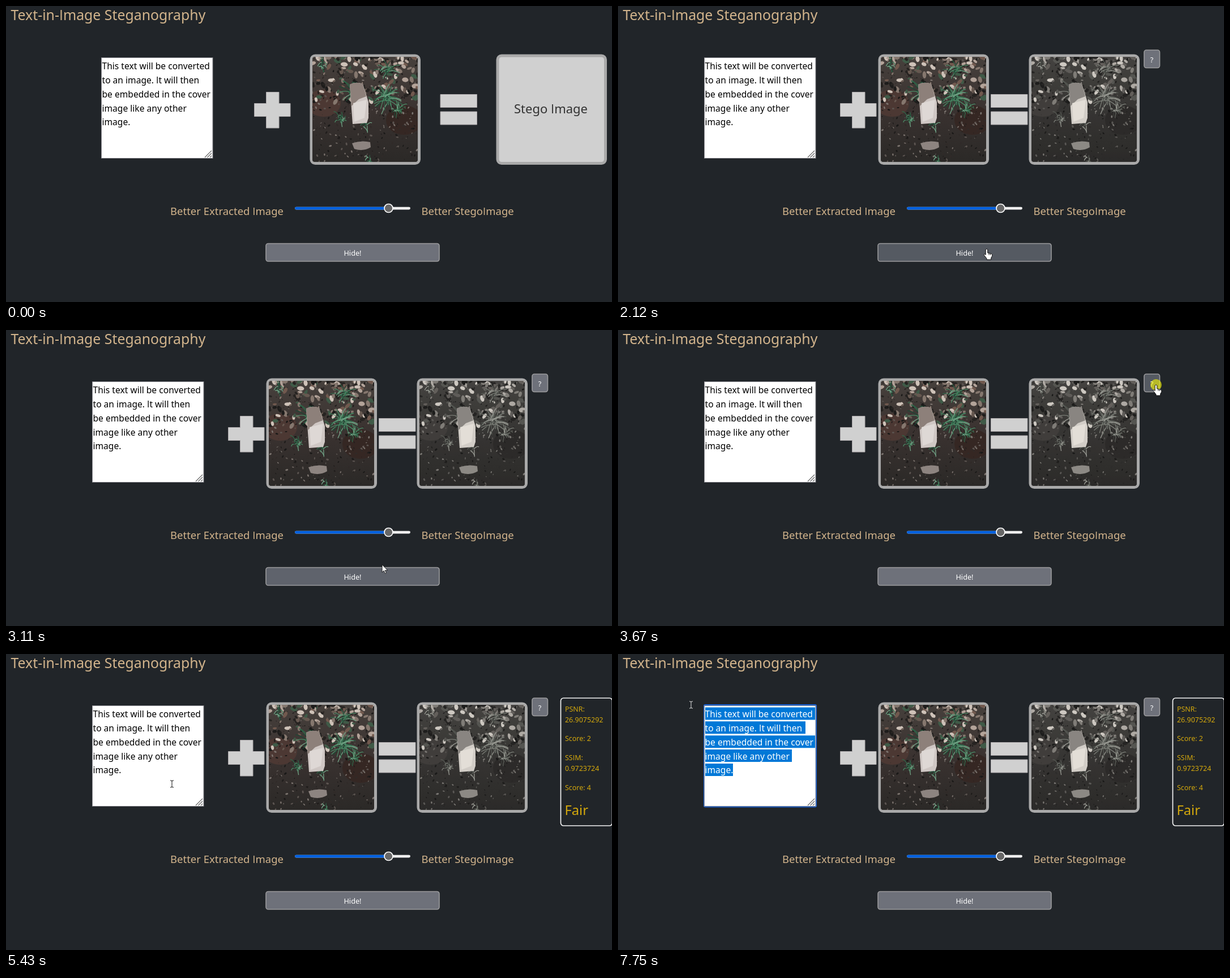
Animation of 1070x524 px, one loop 8000 ms. Source, as an HTML page:

```html
<!DOCTYPE html>
<html lang="en">
<head>
<meta charset="utf-8">
<title>Text-in-Image Steganography</title>
<style>
html, body { margin: 0; width: 100%; height: 100%; overflow: hidden; background: #212529; }
svg { display: block; width: 1070px; height: 524px; }
text { font-family: "Noto Sans", sans-serif; white-space: pre; }
.i { font-family: "Open Sans", sans-serif; }
.tan { fill: #d2b48c; }
.label { font-size: 18.5px; }
.note { font-size: 15.6px; }
.button { stroke: #9b9b9d; stroke-width: 1.6; }
.caption { font-size: 12.7px; fill: #fff; text-anchor: middle; }
.sign { fill: #d0d0d0; stroke: #aaa6a8; stroke-width: 1; }
.frame { fill: none; stroke: #a9a9a9; stroke-width: 5; }
.score { font-size: 12.45px; fill: #d4a80c; }
.pointer { fill: #fff; stroke: #000; stroke-width: .9; stroke-linejoin: round; }
</style>
</head>
<body>
<svg viewBox="0 0 1070 524">
  <defs>
    <clipPath id="inner"><rect width="186" height="186" rx="4"/></clipPath>
    <clipPath id="selected"></clipPath>
    <linearGradient id="soil" x2="0" y2="1">
      <stop offset="0" stop-color="#46403c"/>
      <stop offset=".5" stop-color="#3a3230"/>
      <stop offset="1" stop-color="#2b2927"/>
    </linearGradient>
    <g id="photo" clip-path="url(#inner)"></g>
    <g id="lines" class="note"></g>
  </defs>

  <rect width="1070" height="524" fill="#212529"/>
  <text class="tan" x="8.5" y="25" font-size="24.85">Text-in-Image Steganography</text>

  <g id="note">
    <rect id="focus" x="167" y="89" width="200" height="182.5" rx="3" fill="#1a62d6"/>
    <rect x="168.5" y="91.5" width="196.500" height="178" fill="#fff" stroke="#85858b"/>
    <use href="#lines" fill="#000"/>
    <g clip-path="url(#selected)">
      <rect x="168" y="91" width="200" height="180" fill="#0078d7"/>
      <use href="#lines" fill="#fff"/>
    </g>
    <path d="M351 268L363 256M355.500 268L363 260.500M360 268L363 265" stroke="#666" stroke-width="1.100"/>
  </g>

  <path id="plus" class="sign" d="M459.500 152.500h22.500v20h20v23h-20v20.500h-22.500v-20.500h-21v-23h21z"/>
  <g id="cover">
    <rect class="frame" x="539" y="88" width="190.500" height="190.500" rx="7"/>
    <use href="#photo" x="541" y="90"/>
  </g>
  <path id="equals" class="sign" d="M767 156.500h64.500v23h-64.500zM767 187h64.500v23h-64.500z"/>

  <g id="empty">
    <rect class="frame" x="868" y="88" width="190.500" height="190.500" rx="7" style="fill:#d0d0d0"/>
    <text x="897" y="190" font-size="22" fill="#333">Stego Image</text>
  </g>
  <g id="result">
    <rect class="frame" x="728" y="88" width="190.500" height="190.500" rx="7"/>
    <g style="filter:grayscale(.9) sepia(.12)"><use href="#photo" x="730" y="90"/></g>
    <rect id="help" class="button" x="929" y="78" width="27.500" height="31.500" rx="4"/>
    <text class="caption" x="942.500" y="99.500">?</text>
  </g>

  <g id="panel">
    <rect x="979.500" y="78" width="91" height="226" rx="5" fill="none" stroke="#f4f4f4" stroke-width="1.700"/>
    <g class="score">
      <text x="987" y="101.500">PSNR:</text>
      <text x="987" y="121">26.9075292</text>
      <text x="987" y="154">Score: 2</text>
      <text x="987" y="187.500">SSIM:</text>
      <text x="987" y="207">0.9723724</text>
      <text x="987" y="240.500">Score: 4</text>
      <text x="986.500" y="285" font-size="23.700">Fair</text>
    </g>
  </g>

  <text class="tan label" x="290" y="370">Better Extracted Image</text>
  <text class="tan label" x="733.500" y="370">Better StegoImage</text>
  <rect x="510" y="355.700" width="204" height="4.800" rx="2.400" fill="#efefef"/>
  <rect x="510" y="355.700" width="165" height="4.800" rx="2.400" fill="#0060df"/>
  <circle cx="675.500" cy="358" r="7.500" fill="#676767" stroke="#fff" stroke-width="1.700"/>

  <rect id="hide" class="button" x="459" y="420.500" width="306" height="31.500" rx="4"/>
  <text id="hideText" class="caption" x="612" y="441.700">Hide!</text>

  <g id="cursor">
    <circle id="click" r="10" fill="#ff0" fill-opacity=".58"/>
    <path id="arrow" class="pointer" transform="scale(.85)" d="M0 0V16L3.700 12.500 6.300 18.500 8.700 17.400 6 11.800H11.300Z"/>
    <path id="hand" class="pointer" d="M-1.800 1Q0-1 1.700 1V7L8 8.500Q10.300 9.500 9.700 12.500L7.700 16V19H0V17L-5 10.500Q-4.500 8-1.800 10.500ZM4 8V11M6.500 8.500V11"/>
    <path id="beam" fill="none" d="M-3-6H-1L0-5 1-6H3M0-5V5M-3 6H-1L0 5 1 6H3"/>
  </g>
</svg>

<script>
const el = Object.fromEntries([...document.querySelectorAll('[id]')].map(e => [e.id, e]));
const LOOP = 8000, LAYOUT_AT = 2120;

let seed = 71;
const rand = (lo = 0, hi = 1) => {
  seed = (seed * 16807) % 2147483647;
  return lo + (hi - lo) * seed / 2147483647;
};
const pick = list => list[Math.floor(rand(0, list.length))];
const n1 = v => v.toFixed(1);

function blob(x, y, size, color) {
  return `<ellipse rx="${n1(size)}" ry="${n1(size * rand(.4, .7))}" fill="${color}" ` +
    `transform="translate(${n1(x)} ${n1(y)}) rotate(${n1(rand(0, 180))})"/>`;
}

function tuft(x, y, reach, blades) {
  let out = '';
  for (let i = 0; i < blades; i++) {
    const angle = rand(0, 2 * Math.PI), len = rand(.4, 1) * reach;
    const dx = Math.cos(angle) * len, dy = Math.sin(angle) * len;
    out += `<path d="M${n1(x + rand(-6, 6))} ${n1(y + rand(-6, 6))}q${n1(dx * .6)} ${n1(dy * .6 - 4)} ${n1(dx)} ${n1(dy)}" ` +
      `fill="none" stroke="${pick(['#2f6548', '#4b8a66', '#1f4634', '#73a487'])}" stroke-width="1.3"/>`;
  }
  return out;
}

function buildPhoto() {
  let out = '<rect width="186" height="186" fill="url(#soil)"/>';
  out += '<ellipse cx="20" cy="82" rx="30" ry="24" fill="#4c3833"/><ellipse cx="162" cy="112" rx="32" ry="26" fill="#352723"/>';
  for (let i = 0; i < 420; i++)
    out += blob(rand(0, 186), rand(0, 186), rand(.8, 2.6), pick(['#191817', '#201d1c', '#5c5551', '#7b736e', '#302a28']));
  for (let i = 0; i < 190; i++)
    out += blob(rand(0, 186), 80 * rand() ** 1.3, rand(2.5, 6.5),
      pick(['#b3a399', '#85776e', '#665850', '#cec2b8', '#1d1c1b', '#262321', '#3f5a47', '#71594e']));
  for (const t of [[70, 62, 24, 26], [130, 72, 28, 48], [132, 22, 20, 20], [150, 95, 17, 18],
                   [50, 108, 13, 16], [92, 118, 13, 14], [20, 15, 15, 12], [98, 180, 9, 8]])
    out += tuft(...t);
  return out +
    '<path d="M66 49Q77 43 89 48L99 80V108L96 117 71 119 69 92Z" fill="#cfc7c4"/>' +
    '<path d="M66 49Q77 43 89 48L95 70 82 75 69 87Z" fill="#8d807a"/>' +
    '<path d="M72 82L96 76 92 108 74 115Z" fill="#ded8d5"/>' +
    '<path d="M70 153Q86 147 102 151L103 160Q90 168 74 163Z" fill="#8d8480"/>';
}
el.photo.innerHTML = buildPhoto();

const noteLines = ['This text will be converted', 'to an image. It will then', 'be embedded in the cover', 'image like any other', 'image.'];
const lineEnds = [364, 347, 364, 323, 219];
const PITCH = 24.85, NOTE_X = 170;
el.lines.innerHTML = noteLines.map((s, i) => `<text x="169.5" y="${112 + i * PITCH}">${s}</text>`).join('');
el.selected.innerHTML = noteLines.map((_, i) => `<rect x="${NOTE_X}" y="${94.5 + i * PITCH}" height="22"/>`).join('');
// Plain capital I, without bars
document.querySelectorAll('text').forEach(t => {
  t.innerHTML = t.innerHTML.replace(/I/g, '<tspan class="i">I</tspan>');
});

const start = [656, 524];
const moves = [
  { from: 500, until: 920, steps: 7, to: [651, 430] },
  { from: 2980, until: 3530, steps: 9, to: [950, 97] },
  { from: 3810, until: 4150, steps: 6, to: [851, 308] },
  { from: 4880, until: 5430, steps: 8, to: [293, 230] },
  { from: 6030, until: 6430, steps: 6, to: [111, 75] },
  { from: 7020, until: 7090, steps: 2, to: [115, 88] },
  { from: 7290, until: 7290, steps: 1, to: [91, 97] },
  { from: 7750, until: 7750, steps: 1, to: [129, 90] }
];
const ease = p => p < .5 ? 4 * p ** 3 : 1 - (2 - 2 * p) ** 3 / 2;

function cursorAt(t) {
  let pos = start;
  for (const { from, until, steps, to } of moves) {
    if (t < from) break;
    const gap = (until - from) / (steps - 1) || 1;
    const p = ease(Math.min(steps, 1 + Math.floor((t - from) / gap + .001)) / steps);
    pos = pos.map((v, i) => v + (to[i] - v) * p);
  }
  return pos;
}

const between = (t, a, b) => t >= a && t < b;
const show = (node, on) => node.setAttribute('visibility', on ? 'visible' : 'hidden');
const shift = (node, dx) => node.setAttribute('transform', `translate(${dx} 0)`);
const clamp = (v, lo, hi) => Math.max(lo, Math.min(hi, v));

function hover(node, t, enter, leave) {
  const k = clamp((t - enter) / 150, 0, 1) - clamp((t - leave) / 150, 0, 1);
  const mix = (a, b) => Math.round(a + (b - a) * k);
  node.setAttribute('fill', `rgb(${mix(110, 85)},${mix(113, 90)},${mix(122, 98)})`);
}

function select(t, x, y) {
  const row = y < 93 ? -1 : Math.floor((y - 93) / PITCH);
  [...el.selected.children].forEach((rect, i) => {
    const left = i === row ? clamp(x + 16, NOTE_X, lineEnds[i]) : NOTE_X;
    rect.setAttribute('x', left);
    rect.setAttribute('width', t >= 6030 && i >= row ? lineEnds[i] - left : 0);
  });
}

function render(t) {
  const done = t >= LAYOUT_AT;
  shift(el.note, done ? -16 : 0);
  shift(el.plus, done ? -46 : 0);
  shift(el.cover, done ? -77 : 0);
  shift(el.equals, done ? -108.5 : 0);
  show(el.empty, !done);
  show(el.result, done);
  show(el.panel, t >= 3740);
  show(el.focus, t >= 6030);
  hover(el.hide, t, 780, 3050);
  hover(el.help, t, 3390, 3878);
  el.hideText.textContent = between(t, 1720, LAYOUT_AT) ? 'Processing...' : 'Hide!';

  const [x, y] = cursorAt(t);
  const visible = t >= 500 && !between(t, 7350, 7750);
  const beam = t >= 4880 && x < 349;
  const hand = (x > 459 && x < 765 && y > 420 && y < 452) ||
    (done && x > 928 && x < 957 && y > 77 && y < 110);
  el.cursor.setAttribute('transform', `translate(${n1(x)} ${n1(y)})`);
  show(el.beam, visible && beam);
  show(el.hand, visible && !beam && hand);
  show(el.arrow, visible && !beam && !hand);
  show(el.click, between(t, 1650, 1790) || between(t, 3600, 3740) || between(t, 6030, 6690));
  el.beam.setAttribute('stroke', x > 152 && y > 91 ? '#111' : '#e4e4e4');
  // The last drag fixes the selection
  select(t, ...(t < 6500 ? [x, y] : [111, 75]));
}

const origin = performance.now();
function tick() {
  render((performance.now() - origin) % LOOP);
  requestAnimationFrame(tick);
}
tick();
</script>
</body>
</html>
```
